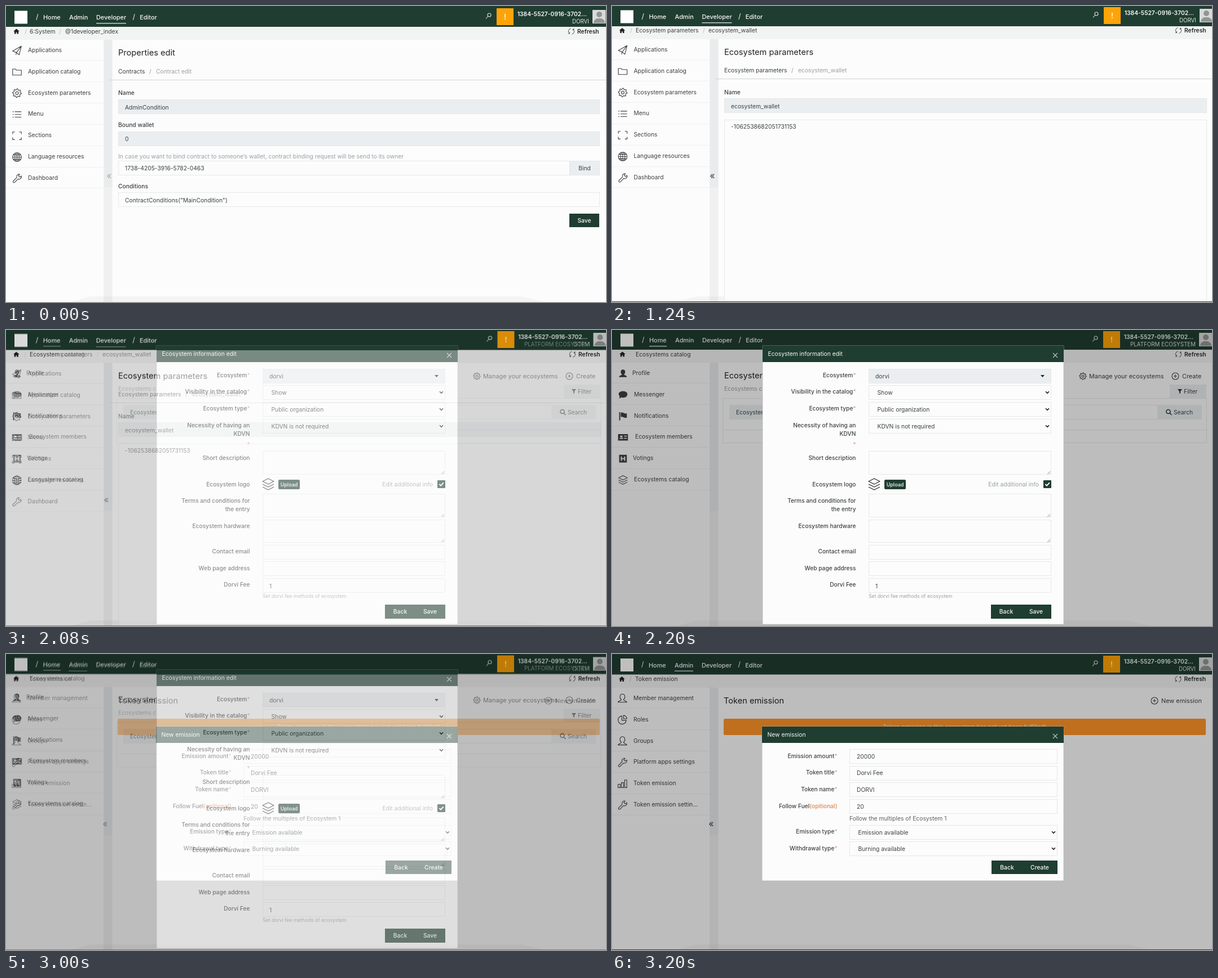
Animation of 1064x526 px, one loop 4.04 s. Source, as an HTML page:

```html
<!DOCTYPE html>
<html lang="en">
<head>
<meta charset="utf-8">
<title>Ecosystem settings</title>
<style>
html, body { margin: 0; width: 100%; height: 100%; overflow: hidden; background: #fcfcfc; }
svg { display: block; width: 100vw; height: 100vh; font-family: Inter, "Noto Sans", sans-serif; }
text { white-space: pre; }
</style>
</head>
<body>
<svg id="stage" viewBox="0 0 1064 526"></svg>
<script>
const GREEN = '#203d31', INK = '#3c4043', GREY = '#9b9fa1', EDGE = '#e6e8e8', FIELD = '#ebeef0', WHITE = '#fcfcfc';

// Drawing helpers; y of a text is the middle of its capitals
const rect = (x, y, x2, y2, fill, extra = '') =>
  `<rect x="${x}" y="${y}" width="${x2 - x}" height="${y2 - y}" fill="${fill}" ${extra}/>`;
const text = (x, y, str, { fill = INK, size = 10.3, weight = 400, anchor = 'start' } = {}) =>
  `<text x="${x}" y="${y + size * 0.364}" fill="${fill}" font-size="${size}" font-weight="${weight}" text-anchor="${anchor}">${str}</text>`;
const line = (d, color, width = 1) => `<path d="${d}" fill="none" stroke="${color}" stroke-width="${width}"/>`;
const box = (x, y, x2, y2, fill = WHITE) => rect(x + .5, y + .5, x2 - .5, y2 - .5, fill, `stroke="${EDGE}"`);
const label = (x, y, str) => text(x, y, str, { weight: 500 });
const white = { fill: '#f7f9f8', weight: 500 };

const ring = r => `M${-r} 0a${r} ${r} 0 1 0 ${2 * r} 0a${r} ${r} 0 1 0 ${-2 * r} 0`;
const gear = 'M' + Array.from({ length: 32 }, (_, i) => {
  const r = i % 4 < 2 ? 8 : 6, a = i * Math.PI / 16;
  return `${(r * Math.cos(a)).toFixed(2)} ${(r * Math.sin(a)).toFixed(2)}`;
}).join('L') + 'Z' + ring(2.6);

const outlines = {
  gear,
  plane: 'M-8 1L8-8L4 8L-1 4ZM8-8L-1 4L-2 8',
  folder: 'M-8-5h5l2 2h9v9h-16z',
  list: 'M-8-5h2M-8 0h2M-8 5h2M-4-5H8M-4 0H8M-4 5H8',
  corners: 'M-8-3v-4h4M4-7h4v4M8 3v4h-4M-4 7h-4v-4',
  globe: ring(8) + 'M-4 0a4 8 0 1 0 8 0a4 8 0 1 0-8 0M0-8V8M-8 0H8M-7-4H7M-7 4H7',
  wrench: 'M5-7.5A4.5 4.5 0 0 0-.5-1.5L-7 5A1.8 1.8 0 0 0-4.5 7.5L2 1A4.5 4.5 0 0 0 8-4.5L5-2.5L2.5-5Z',
  user: 'M-8 7C-8 4-2 5-2 2C-6-1-5-8 0-8S6-1 2 2C2 5 8 4 8 7Z',
  pie: 'M-1-7A7.5 7.5 0 1 0 7 1H-1ZM2-8V-2H8A6 6 0 0 0 2-8Z',
  bars: 'M-8 7V1h4v6zM-2 7V-2h4v9zM4 7V-7h4v14z',
  layers: 'M0-8L8-4L0 0L-8-4ZM-8 0L0 4L8 0M-8 4L0 8L8 4',
  refresh: 'M-1-5A5 5 0 0 0-3 4M1 5A5 5 0 0 0 3-4M-5.5 4h2.5v-2.5M5.5-4H3v2.5',
  plus: ring(6) + 'M-3 0H3M0-3V3',
  search: 'M-5-1a3.5 3.5 0 1 0 7 0a3.5 3.5 0 1 0-7 0M1.5 2L4.5 5',
  key: 'M-2-2a3 3 0 1 0 6 0a3 3 0 1 0-6 0M-1 0L-5 4.5',
  cross: 'M-4-4L4 4M4-4L-4 4',
  chevron: 'M-3-1.7L0 1.4L3-1.7',
  tick: 'M-3.5 0L-1 2.7L3.8-2.7'
};
const solids = {
  home: 'M0-5L6 0H4V5H1V2H-1V5H-4V0H-6Z',
  person: 'M-7 7C-7 3-2 4-2 2C-5-1-5-7 0-7S5-1 2 2C2 4 7 3 7 7Z',
  comment: 'M-8-1C-8-8 8-8 8-1S-1 6-3 5L-7 7L-6 3Q-8 1-8-1Z',
  flag: 'M-7-7h2v15h-2zM-4-6C0-8 2-3 7-5V3C2 5 0 0-4 2Z',
  card: 'M-9-6H9V6H-9ZM-6 3h6v-2h-6zM-5-3h4v3h-4zM2-3h5v1.5h-5zM2 1h5v1.5h-5z',
  ballot: 'M-7-7H7V7H-7ZM-4-4V4H-2V1H2V4H4V-4H2V-1H-2V-4Z',
  funnel: 'M-4-4H4L1 0V4L-1 3V0Z',
  caret: 'M-3.5-2H3.5L0 2Z'
};
function icon(name, x, y, color = INK, scale = 1, width = 1.1) {
  const paint = solids[name]
    ? `fill="${color}" fill-rule="evenodd"`
    : `fill="none" stroke="${color}" stroke-width="${width / scale}" stroke-linejoin="round"`;
  return `<path transform="translate(${x} ${y}) scale(${scale})" d="${solids[name] || outlines[name]}" ${paint}/>`;
}

// Header, breadcrumb bar and sidebar shared by all screens
function page({ top, navX, navY, active, userX, userY, user, crumbX, crumbY, crumbs, refreshX,
                items, itemY, itemX = 39, arrow, arrowFill = INK }) {
  let out = rect(0, 0, 1064, 526, WHITE) + rect(0, top, 1064, top + 23, '#f2f3f3')
    + rect(173, top + 23, 188.5, 526, '#f0f0f0') + rect(174, top + 23, 188.5, 322, '#e9ebec')
    + '<path d="M115 526L150 516H915L955 526Z" fill="#000" opacity=".03"/>'
    + rect(0, 0, 1064, top, GREEN) + rect(15, navY - 12, 38, navY + 11, '#fff');

  const slash = { ...white, size: 12.5, weight: 400 };
  out += text(navX - 13, navY - 1.5, '/', slash) + text(navX + 158.5, navY - 1.5, '/', slash);
  [['Home', 0, 31], ['Admin', 46, 33], ['Developer', 94, 53], ['Editor', 171.3, 32]].forEach(([name, dx, w]) => {
    out += text(navX + dx, navY, name, { ...white, size: 10.9 });
    if (name === active) out += rect(navX + dx, navY + 9.5, navX + dx + w, navY + 11, '#c3d0d6');
  });

  const x = userX, y = userY;
  out += icon('key', x - 29, y - 1, '#dfe6e2')
    + rect(x - 15, y - 15, x + 15, y + 15, '#ffa408')
    + rect(x - .8, y - 5, x + .8, y + 1.5, '#fff') + rect(x - .8, y + 3, x + .8, y + 5, '#fff')
    + text(x + 145, y - 5, '1384-5527-0916-3702...', { ...white, size: 10.3, weight: 600, anchor: 'end' })
    + text(x + 149, y + 8, user, { fill: '#e3e9e6', size: 9.8, anchor: 'end' })
    + rect(x + 155, y - 12, x + 178.5, y + 12, '#d9dbda')
    + `<circle cx="${x + 167}" cy="${y - 4}" r="5" fill="#929594"/>`
    + `<path d="M${x + 157} ${y + 11}Q${x + 158} ${y + 4} ${x + 164} ${y + 3}H${x + 170}Q${x + 176} ${y + 4} ${x + 177} ${y + 11}Z" fill="#929594"/>`;

  out += icon('home', crumbX, crumbY, '#222', .9);
  crumbs.forEach(([cx, str]) => out += text(cx, crumbY, str, { fill: str === '/' ? '#bbb' : INK }));
  out += icon('refresh', refreshX - 10.5, crumbY, INK, 1, .9)
    + text(refreshX, crumbY, 'Refresh', { fill: '#25292b', weight: 600 });

  items.forEach(([pic, str, tx = itemX], i) => {
    const cy = itemY + i * 37.9;
    out += icon(pic, itemX - 19.5, cy + 1, INK, .97) + text(tx, cy, str)
      + line(`M0 ${Math.round(cy + 18) + .5}H173`, '#f0f0f0');
  });
  if (arrow) out += text(arrow, 301, '«', { size: 16, fill: arrowFill, anchor: 'middle' });
  return out;
}

const title = (x, y, str) => text(x, y, str, { size: 14.6, fill: '#222' });
const button = (x, y, x2, y2, parts) => rect(x, y, x2, y2, GREEN)
  + parts.map(([cx, str]) => text(cx, (y + y2) / 2, str, { ...white, anchor: 'middle' })).join('');
const star = '<tspan fill="#d9998c" font-weight="400">*</tspan>';
const rightLabels = (x, rows) => rows.map(([y, str]) =>
  text(x, y, str.replace('*', star), { size: 10.2, weight: 500, anchor: 'end' })).join('');
const select = (x, y, x2, str) => box(x, y, x2, y + 26) + text(x + 15.5, y + 13.3, str)
  + icon('chevron', x2 - 7, y + 13, '#222', 1, 1.6);
const grip = y => line(`M772 ${y - 1}l5-5M775 ${y - 1}l2-2`, '#888', .9);
const modal = (x, y, x2, y2, str) => rect(0, 0, 1064, 526, '#000', 'opacity=".25"')
  + rect(x, y, x2, y2, WHITE, 'stroke="#b4b9b6" stroke-width=".7"') + rect(x, y, x2, y + 29, GREEN)
  + text(x + 9.5, y + 14.5, str, { fill: '#f7f9f8' }) + icon('cross', 786, y + 17, '#b9c6bf');

const developerItems = [['plane', 'Applications'], ['folder', 'Application catalog'], ['gear', 'Ecosystem parameters'],
  ['list', 'Menu'], ['corners', 'Sections'], ['globe', 'Language resources'], ['wrench', 'Dashboard']];

const contract = () => page({
    top: 37, navX: 66, navY: 20.5, active: 'Developer', userX: 885, userY: 19, user: 'DORVI',
    crumbX: 18.5, crumbY: 45, crumbs: [[33, '/'], [42, '6:System'], [94, '/'], [105, '@1developer_index']],
    refreshX: 1013, items: developerItems, itemY: 78, arrow: 183, arrowFill: '#aaa' })
  + title(199, 83, 'Properties edit')
  + text(199, 116, 'Contracts') + text(254, 116, '/', { fill: GREY }) + text(266, 116, 'Contract edit', { fill: GREY })
  + line('M184 131.5H1064', '#cfd2d2')
  + label(199, 154.5, 'Name') + box(199, 166, 1053, 192, FIELD) + text(211, 180, 'AdminCondition')
  + label(199, 211, 'Bound wallet') + box(199, 223, 1053, 249, FIELD) + text(211, 236, '0')
  + text(199, 267.5, 'In case you want to bind contract to someone’s wallet, contract binding request will be send to its owner', { fill: GREY })
  + box(199, 275, 1000, 301) + text(211, 288.5, '1738-4205-3916-5782-0463')
  + box(1000, 275, 1053, 301, FIELD) + text(1026, 288, 'Bind', { anchor: 'middle' })
  + label(199, 320, 'Conditions') + box(199, 331, 1053, 357) + text(211, 345, 'ContractConditions("MainCondition")')
  + button(999, 369, 1052, 393, [[1025.5, 'Save']]);

const parameters = () => page({
    top: 36, navX: 65.5, navY: 19.5, active: 'Developer', userX: 887, userY: 17, user: 'DORVI',
    crumbX: 18, crumbY: 43.5, crumbs: [[32, '/'], [42, 'Ecosystem parameters'], [161, '/'], [171, 'ecosystem_wallet']],
    refreshX: 1015, items: developerItems, itemY: 77, itemX: 38.5, arrow: 178 })
  + title(199, 82, 'Ecosystem parameters')
  + text(199, 114, 'Ecosystem parameters') + text(318, 114, '/', { fill: GREY }) + text(330, 114, 'ecosystem_wallet', { fill: GREY })
  + line('M184 129.5H1064', '#cfd2d2')
  + label(199, 153, 'Name') + box(199, 164, 1055, 190, FIELD) + text(211, 178, 'ecosystem_wallet')
  + box(199, 202, 1055, 530) + text(211, 214.5, '-1062538682051731153')
  + rect(0, 525, 1064, 526, '#333');

const ecosystem = () => page({
    top: 35, navX: 66, navY: 18.5, active: 'Home', userX: 886, userY: 17, user: 'PLATFORM ECOSYSTEM',
    crumbX: 18.5, crumbY: 43, crumbs: [[42, 'Ecosystems catalog']], refreshX: 1015,
    items: [['person', 'Profile', 36], ['comment', 'Messenger'], ['flag', 'Notifications'],
      ['card', 'Ecosystem members', 41], ['ballot', 'Votings', 37], ['layers', 'Ecosystems catalog']], itemY: 76 })
  + title(199, 81, 'Ecosystems catalog') + text(199, 104, 'Ecosystems catalog', { fill: GREY })
  + icon('gear', 835, 82, INK, .75) + text(846, 82, 'Manage your ecosystems', { size: 10.9 })
  + icon('plus', 999, 82) + text(1011, 82, 'Create', { size: 10.9 })
  + rect(989, 97, 1054, 121, FIELD) + icon('funnel', 1007, 109, '#333') + text(1014, 109, 'Filter')
  + box(196, 121, 1055, 201) + line('M197 177.5H1055', EDGE)
  + box(208, 133, 1046, 159) + rect(208, 133, 290, 159, FIELD) + text(220, 146.5, 'Ecosystem')
  + rect(967, 133, 1046, 159, FIELD) + icon('search', 988, 146, '#333', 1, 1.6) + text(996, 146, 'Search')
  + modal(267, 28, 801, 523, 'Ecosystem information edit')
  + rightLabels(432.5, [[80, 'Ecosystem*'], [109.5, 'Visibility in the catalog*'], [139, 'Ecosystem type*'],
      [169, 'Necessity of having an'], [184.5, 'KDVN'], [203, '*'], [227, 'Short description'],
      [274.5, 'Ecosystem logo'], [303, 'Terms and conditions for'], [318.5, 'the entry'],
      [348, 'Ecosystem hardware'], [393, 'Contact email'], [423, 'Web page address'], [452.5, 'Dorvi Fee']])
  + box(455, 69, 779, 95, FIELD) + text(467, 82, 'dorvi') + icon('caret', 763.5, 82, '#222')
  + select(455, 98, 779, 'Show') + select(455, 128, 779, 'Public organization')
  + select(455, 158, 779, 'KDVN is not required')
  + [[215, 257], [291, 333], [337, 378]].map(([y, y2]) => box(455, y, 779, y2) + grip(y2)).join('')
  + [382, 411, 441].map(y => box(455, y, 779, y + 26)).join('') + text(467, 455, '1')
  + icon('layers', 465, 274, '#222', 1.25)
  + rect(483, 266, 521, 283, GREEN, 'rx="2"') + text(502, 274.5, 'Upload', { ...white, size: 9, anchor: 'middle' })
  + text(757, 274.5, 'Edit additional info', { fill: GREY, anchor: 'end' })
  + rect(765, 267, 779, 281, GREEN, 'rx="1"') + icon('tick', 772, 274, '#fff', 1, 1.9)
  + text(455, 472.5, 'Set dorvi fee methods of ecosystem', { fill: GREY, size: 8.7 })
  + button(672, 488, 779, 513, [[699, 'Back'], [752, 'Save']]);

const emission = () => page({
    top: 36.5, navX: 65, navY: 20, active: 'Admin', userX: 886, userY: 18, user: 'DORVI',
    crumbX: 17.5, crumbY: 44.5, crumbs: [[31, '/'], [41, 'Token emission']], refreshX: 1014.5,
    items: [['user', 'Member management'], ['pie', 'Roles'], ['user', 'Groups'], ['wrench', 'Platform apps settings'],
      ['bars', 'Token emission'], ['wrench', 'Token emission settin...']], itemY: 78, itemX: 38, arrow: 176 })
  + title(198, 83, 'Token emission')
  + icon('plus', 962, 83) + text(974, 83.5, 'New emission', { size: 10.9 })
  + rect(198, 115, 1053, 144, '#ff9428', 'rx="2"')
  + text(625, 129.5, 'Token emission in this ecosystem has not yet been fulfilled!', { fill: '#ffe6cc', anchor: 'middle' })
  + modal(266, 129, 801, 403, 'New emission')
  + rightLabels(399.5, [[181, 'Emission amount*'], [210.5, 'Token title*'], [240, 'Token name*'],
      [270, 'Follow Fuel<tspan fill="#dd8450">(opitional)</tspan>'], [315, 'Emission type*'], [345, 'Withdrawal type*']])
  + ['20000', 'Dorvi Fee', 'DORVI', '20'].map((str, i) => {
      const y = 169 + i * 29.7;
      return box(421, Math.round(y), 790, Math.round(y) + 26) + text(434, y + 13, str);
    }).join('')
  + text(421, 292, 'Follow the multiples of Ecosystem 1', { fill: '#5c6062' })
  + select(421, 304, 790, 'Emission available') + select(421, 333, 790, 'Burning available')
  + button(673, 367, 790, 391, [[700.5, 'Back'], [758.5, 'Create']])
  + rect(0, 525, 1064, 526, '#333');

const stage = document.getElementById('stage');
stage.innerHTML = [contract, parameters, ecosystem, emission].map(draw => `<g>${draw()}</g>`).join('');

// Each later screen fades in over the one below it, in steps of 40 ms
const LOOP = 4040, STEP = 40;
const fades = [[920, 9], [1960, 7], [2880, 9]];
const begin = performance.now();
function frame() {
  const t = (performance.now() - begin) % LOOP;
  fades.forEach(([start, steps], i) => {
    const alpha = (Math.floor((t - start) / STEP) + 1) / steps;
    stage.children[i + 1].style.opacity = Math.min(1, Math.max(0, alpha));
  });
  requestAnimationFrame(frame);
}
frame();
</script>
</body>
</html>
```
